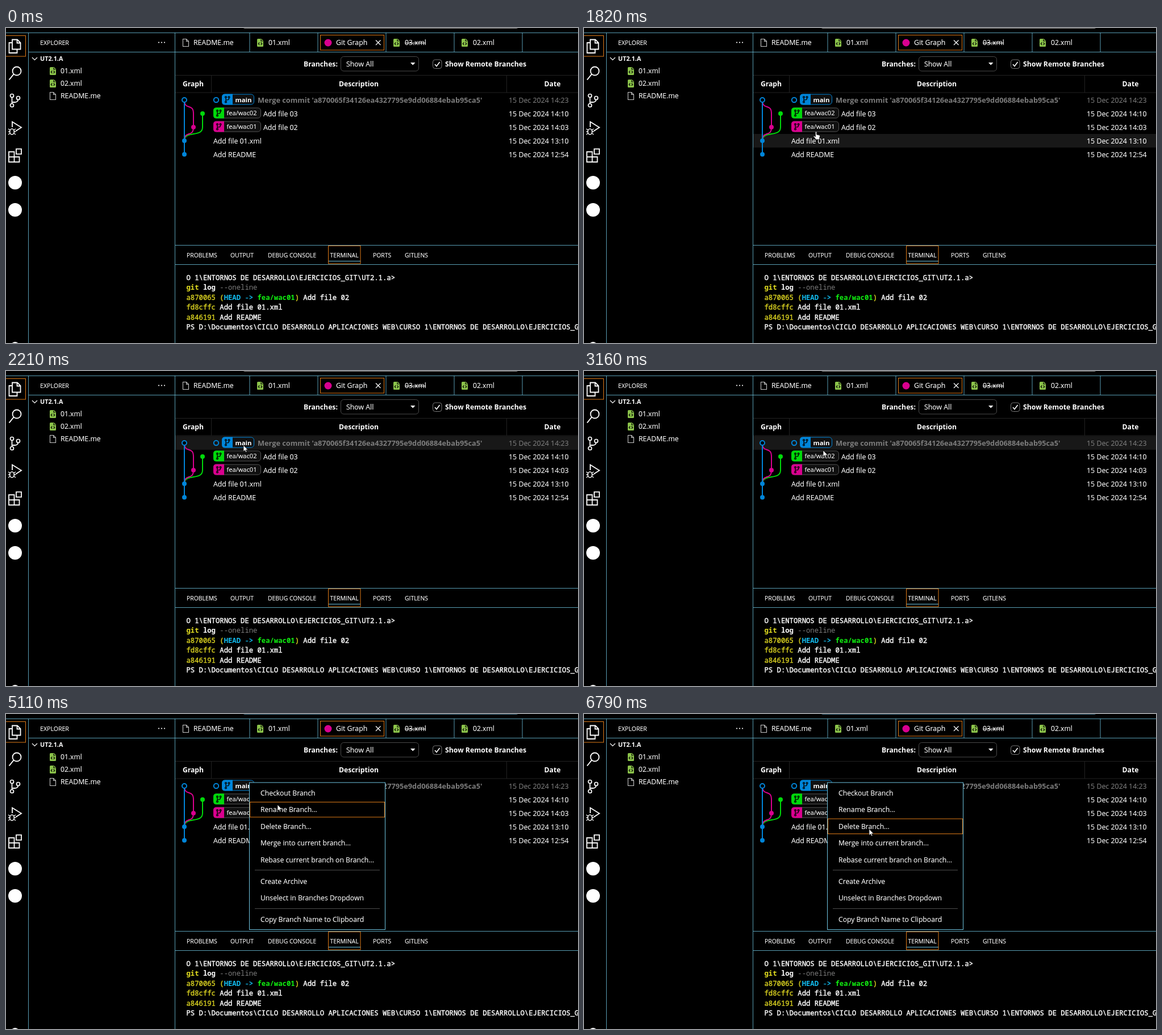
An HTML page that plays this animation: 1007x556 px, repeating every 8 s.

```html
<!DOCTYPE html>
<html lang="en">
<head>
<meta charset="utf-8">
<title>Git branch menu</title>
<style>
html, body { margin: 0; width: 100%; height: 100%; overflow: hidden; background: #000; }
svg { display: block; width: 1007px; height: 556px; color: #fff; }
text { font-family: "Open Sans", "Noto Sans", sans-serif; fill: currentColor; stroke: currentColor; stroke-width: .12px; white-space: pre; }
tspan { fill: currentColor; stroke: currentColor; }
.b { font-weight: 700; stroke: none; }
.mono { font-family: "Noto Sans Mono", "DejaVu Sans Mono", monospace; font-size: 12.25px; font-weight: 500; stroke-width: .4px; }
.thin { stroke-width: 0; }
</style>
</head>
<body>
<svg id="stage" viewBox="0 0 1007 556">
  <defs>
    <g id="xml">
      <path d="M1.5 0H7.5L11 3.5V12.5Q11 14 9.5 14H1.5Q0 14 0 12.5V1.5Q0 0 1.5 0Z" fill="#8bc34a"/>
      <path d="M7 .8V4H10.3M4.3 6.5L2.3 8.7L4.3 10.9M6.7 6.5L8.7 8.7L6.7 10.9" fill="none" stroke="#000" stroke-width="1.2"/>
    </g>
    <path id="doc" d="M.5 .5H6.5L10.5 4.5V13.5H.5ZM6.5 .5V4.5H10.5" fill="none" stroke="#c5c5c5" stroke-width="1.1"/>
    <g id="fork" fill="none" stroke="#000" stroke-width="1.3">
      <path d="M-2.5 -2.5V3M3 -2.5V-1.5Q3 .8 .5 .8H-2.5"/>
      <circle cx="-2.5" cy="-4" r="1.4"/><circle cx="3" cy="-4" r="1.4"/><circle cx="-2.5" cy="4.5" r="1.4"/>
    </g>
  </defs>
  <g id="base"></g>
  <rect id="hover" x="298" width="709" height="24" fill="#181818"/>
  <g id="table"></g>
  <g id="menu"></g>
  <rect id="top" x="417" y="-12" width="485" height="12.7" rx="4" fill="none"/>
  <g id="cursor">
    <path id="arrow" d="M0 0V11.2L2.6 8.8L4.2 12.4L6 11.6L4.4 8.2H7.8Z" fill="#fff" stroke="#000" stroke-width=".7"/>
    <path id="hand" d="M-.7 .6Q.5 -1 1.7 .6V5L6.500 6.200Q7.700 6.600 7.500 8L6.500 12V14H-.7V12.400L-3.900 8.600Q-4.100 7 -2.500 7.400L-.7 9Z" fill="#fff" stroke="#000" stroke-width=".8"/>
    <path id="beam" d="M-2.5 -4.5H-.8L0 -4L.8 -4.5H2.5M0 -4V4M-2.5 4.5H-.8L0 4L.8 4.5H2.5" fill="none" stroke="#ddd"/>
  </g>
</svg>
<script>
const LINE = '#6fc3df', FOCUS = '#de7a17';
const BLUE = '#0085d9', PINK = '#d9008f', GREEN = '#00d90a', GRAY = '#7c7c7c';
const $ = id => document.getElementById(id);

// markup helpers; text is placed by the centre of its capitals
const text = (x, y, s, size = 12.3, more = '', color = '#fff') =>
  `<text x="${x}" y="${y + size * .36}" style="font-size:${size}px;color:${color}" ${more}>${s}</text>`;
const rect = (x, y, w, h, more, fill = 'none') =>
  `<rect x="${x}" y="${y}" width="${w}" height="${h}" fill="${fill}" ${more}/>`;
const path = (d, stroke = '#fff', w = 1, more = '') =>
  `<path d="${d}" fill="none" stroke="${stroke}" stroke-width="${w}" ${more}/>`;
const dot = (x, y, r, fill, more = '') => `<circle cx="${x}" cy="${y}" r="${r}" fill="${fill}" ${more}/>`;
const use = (id, x, y) => `<use href="#${id}" x="${x}" y="${y}"/>`;
const ring = (x, y, r, w) => dot(x, y, r, '#000', `stroke="#fff" stroke-width="${w}"`);

function frameLines() {
  const tabEdges = [429, 549, 669, 789, 909].map(x => `M${x} 8V42`).join('');
  return path('M0 8.5H1007M39.5 8V556M297.5 8V556M40 42.5H1007M298 383.5H1007M298 417.5H1007' + tabEdges, LINE, 1, 'opacity=".8"');
}

function activityBar() {
  const out = [
    rect(-1, 13.5, 35.5, 36.5, `stroke="${FOCUS}"`),
    path('M11 20.5H20L25.5 26V37.5H11ZM19.5 20.5V26.5H25.5M11 26H5.5V44H19.5V38', '#fff', 1.8),
    path('M13.5 81.5L5.5 91.5', '#fff', 2), ring(19, 76, 7.5, 1.8),
    path('M10.5 121V136M21.5 126Q21 131 15 131H10.5', '#fff', 1.8),
    ring(10.5, 119.5, 3, 1.7), ring(21.5, 123.5, 3, 1.7), ring(10.5, 136.5, 3, 1.7),
    path('M11 175V165.5L27 175.5L17 182', '#fff', 1.8),
    path('M4 178L7 180M17 178L14 180M4 183H17M4 188L7 186M17 188L14 186', '#fff', 1.3),
    '<ellipse cx="10.5" cy="183" rx="3.8" ry="5" fill="#000" stroke="#fff" stroke-width="1.6"/>',
    path('M5 218.5H14.5V236.5H5ZM5 227.5H23.5V236.5H14.5', '#fff', 1.8),
    rect(18, 213.5, 9, 9, 'stroke="#fff" stroke-width="1.8"'),
    dot(16, 273, 12, '#fff'), dot(16, 321, 12, '#fff'),
    ring(16, 562, 7, 1.8)
  ];
  return out.join('');
}

function explorer() {
  return text(60, 26, 'EXPLORER', 10.6) +
    [269, 274, 279].map(x => dot(x, 25.5, 1.1, '#fff')).join('') +
    path('M46 52L50.5 56.5L55 52', '#fff', 1.2) +
    text(60, 54, 'UT2.1.A', 10.8, 'class="b"') +
    use('xml', 77, 69) + text(96, 76, '01.xml', 12.1) +
    use('xml', 77, 91) + text(96, 98, '02.xml', 12.1) +
    use('doc', 77, 113) + text(96, 120, 'README.me');
}

function tabs() {
  return use('doc', 311, 19) + text(330, 26, 'README.me') +
    use('xml', 442, 19) + text(462, 26, '01.xml', 12.1) +
    rect(553.5, 12.5, 112, 26.5, `stroke="${FOCUS}"`) +
    dot(567, 26, 6.5, PINK) + text(581, 26, 'Git Graph') +
    path('M651 21.5L659.5 30M659.5 21.5L651 30', '#fff', 1.2) +
    use('xml', 682, 19) + text(702, 26, '03.xml', 12.1) + path('M702 26.5H739') +
    use('xml', 802, 19) + text(822, 26, '02.xml', 12.1);
}

function controls() {
  const head = 'class="b" text-anchor="middle"';
  return text(524, 63.5, 'Branches:', 12.2, 'class="b"') +
    rect(589.5, 50.5, 137, 25.5, 'rx="5" stroke="#4a4a4a"') + text(599, 63.5, 'Show All') +
    '<path d="M712 61H720.5L716.2 65.5Z" fill="#fff"/>' +
    rect(751.5, 56, 15.5, 15.5, 'rx="4" stroke="#777"') +
    path('M755 64L758 67.5L763.5 60', '#fff', 1.6) +
    text(773, 63.5, 'Show Remote Branches', 12.25, 'class="b"') +
    path('M298 83.5H1007M298 114H1007M361.5 83V114M881.5 83V114', '#222') +
    text(329.5, 99, 'Graph', 12.2, head) + text(621, 99, 'Description', 12.2, head) + text(962, 99, 'Date', 12.2, head);
}

function panel() {
  const names = [[318, 'PROBLEMS'], [395, 'OUTPUT'], [461, 'DEBUG CONSOLE'], [570.5, 'TERMINAL'], [646, 'PORTS'], [702, 'GITLENS']];
  const span = (color, s, more = '') => `<tspan style="color:${color}" ${more}>${s}</tspan>`;
  const bold = (color, s) => span(color, s, 'font-weight="700" class="thin"');
  const hash = s => span('#d8d020', s);
  const cyan = '#12bdf0';
  const rows = [
    'O 1\\ENTORNOS DE DESARROLLO\\EJERCICIOS_GIT\\UT2.1.a&gt;',
    bold('#e5e020', 'git') + bold('#fff', ' log ') + span(GRAY, '--oneline', 'class="thin"'),
    hash('a870065 (') + bold(cyan, 'HEAD') + span(cyan, ' -&gt; ') + bold('#10f010', 'fea/wac01') + hash(')') + ' Add file 02',
    hash('fd8cffc') + ' Add file 01.xml',
    hash('a846191') + ' Add README',
    'PS D:\\Documentos\\CICLO DESARROLLO APLICACIONES WEB\\CURSO 1\\ENTORNOS DE DESARROLLO\\EJERCICIOS_GIT\\UT2.1.a&gt;'
  ];
  return names.map(([x, s]) => text(x, 401, s, 10.4)).join('') +
    rect(567.5, 384.5, 56.5, 31.5, `stroke="${FOCUS}"`) + path('M568 411.5H624', LINE) +
    rows.map((s, i) => `<text class="mono" xml:space="preserve" x="317.5" y="${445 + i * 17.4}">${s}</text>`).join('');
}

function badge(x, y, w, color, border, label) {
  return rect(x + .5, y - 9, w - 1, 18, `rx="5" stroke="${border}"`, '#101010') +
    `<path d="M${x + 19} ${y - 9.5}H${x + 5}Q${x} ${y - 9.5} ${x} ${y - 4}V${y + 4}Q${x} ${y + 9.5} ${x + 5} ${y + 9.5}H${x + 19}Z" fill="${color}"/>` +
    use('fork', x + 9.5, y) + label;
}

function table() {
  const dates = ['14:23', '14:10', '14:03', '13:10', '12:54'];
  return path('M346 151V175C346 194 314 180 314 199', GREEN, 2) +
    path('M314 127C314 146 330 132 330 151V175C330 194 314 180 314 199', PINK, 2) +
    path('M314 127V223', BLUE, 2) +
    dot(314, 127, 4, '#000', `stroke="${BLUE}" stroke-width="2"`) +
    dot(346, 151, 4, GREEN) + dot(330, 175, 4, PINK) + dot(314, 199, 4, BLUE) + dot(314, 223, 4, BLUE) +
    dot(370, 127, 4.2, 'none', `stroke="${BLUE}" stroke-width="2"`) +
    badge(380, 126, 57, BLUE, BLUE, text(403.5, 126.5, 'main', 11.4, 'class="b"')) +
    badge(365, 150, 84, GREEN, '#555', text(388.5, 150.5, 'fea/wac02', 11.1)) +
    badge(365, 174, 84, PINK, '#555', text(388.5, 174.5, 'fea/wac01', 11.1)) +
    text(443, 127.5, "Merge commit 'a870065f34126ea4327795e9dd06884ebab95ca5'", 12.75, 'class="b"', GRAY) +
    text(453, 151.5, 'Add file 03') + text(453, 175.5, 'Add file 02') +
    text(365, 199.5, 'Add file 01.xml') + text(365, 223.5, 'Add README') +
    dates.map((d, i) => text(885, 127.5 + i * 24, '15 Dec 2024 ' + d, 12.4, '', i ? '#fff' : GRAY)).join('');
}

const ITEMS = [[140, 'Checkout Branch'], [169, 'Rename Branch...'], [198.5, 'Delete Branch...'],
  [228, 'Merge into current branch...'], [257.5, 'Rebase current branch on Branch...'],
  [295.5, 'Create Archive'], [325, 'Unselect in Branches Dropdown'], [363, 'Copy Branch Name to Clipboard']];

function menu() {
  return rect(428.5, 121, 239, 259.5, `stroke="${LINE}"`, '#000') +
    path('M438 275.5H658M438 343.5H658', '#4c4c4c') +
    rect(429.5, 0, 237, 26.5, `id="pick" stroke="${FOCUS}"`) +
    ITEMS.map(([y, s]) => text(448, y, s, 12.2)).join('');
}

$('base').innerHTML = frameLines() + activityBar() + explorer() + tabs() + controls() + panel();
$('table').innerHTML = table();
$('menu').innerHTML = menu();

// pointer bursts: start, end, number of steps
const BURSTS = [[970, 1740, 12], [1820, 2410, 9], [2940, 2940, 1], [3090, 3560, 8],
  [3890, 4020, 3], [4630, 5430, 13], [5500, 6240, 12], [6370, 6790, 7]];
// pointer path: time, x, y
const KEYS = [[970, 756, 552], [1250, 600, 400], [1500, 440, 230], [1740, 408, 187],
  [1820, 408, 183], [1968, 411, 152], [2115, 416, 134], [2188, 418, 131], [2410, 418, 128],
  [2940, 417, 127], [3090, 418, 130], [3420, 432, 181], [3560, 431, 171], [4020, 431, 171],
  [4630, 434, 167], [4800, 450, 148], [4960, 466, 148], [5097, 478, 160], [5430, 496, 226],
  [5500, 497, 222], [5760, 496, 173], [6240, 512, 301], [6370, 512, 297], [6790, 502, 203]];

function snap(t) {
  const [a, b, n] = BURSTS.filter(s => s[0] <= t).pop();
  if (n < 2) return a;
  const step = (b - a) / (n - 1);
  return a + Math.min(n - 1, Math.floor((t - a) / step + 1e-6)) * step;
}

function pointer(t) {
  t = snap(Math.max(t, 970));
  const i = KEYS.findIndex(k => k[0] >= t - .01);
  if (i < 0) return KEYS[KEYS.length - 1].slice(1);
  if (i === 0) return KEYS[0].slice(1);
  const p = KEYS[i - 1], q = KEYS[i], u = Math.min(1, (t - p[0]) / (q[0] - p[0]));
  return [p[1] + (q[1] - p[1]) * u, p[2] + (q[2] - p[2]) * u];
}

const inRow = y => y >= 114 && y < 235;
const onBadge = (x, y) => (y >= 117 && y < 135 && x > 380 && x < 437) ||
  (x > 365 && x < 449 && ((y >= 141 && y < 159) || (y >= 165 && y < 184)));
const show = (id, on) => { $(id).style.display = on ? '' : 'none'; };

function draw(t) {
  const live = t >= 970, open = t >= 4020;
  const [x, y] = pointer(t), [hx, hy] = pointer(t - 70); // hover trails the pointer
  const hand = !open && inRow(hy) && !onBadge(hx, hy), beam = y > 417;

  show('cursor', live);
  $('cursor').setAttribute('transform', `translate(${Math.round(x)} ${Math.round(y)})`);
  $('cursor').setAttribute('opacity', t >= 3890 && !open ? .65 : 1);
  show('beam', beam);
  show('hand', hand && !beam);
  show('arrow', !hand && !beam);

  show('hover', live && !open && inRow(hy));
  $('hover').setAttribute('y', 115 + Math.floor((hy - 115) / 24) * 24);
  $('top').setAttribute('stroke', t >= 3890 ? '#43738a' : '#8a8a8a');

  show('menu', open);
  const item = ITEMS.find(([c]) => Math.abs(y - c) < 14.75);
  show('pick', item);
  if (item) $('pick').setAttribute('y', item[0] - 13.5);
}

function tick() {
  draw(performance.now() % 8000);
  requestAnimationFrame(tick);
}
tick();
</script>
</body>
</html>
```
